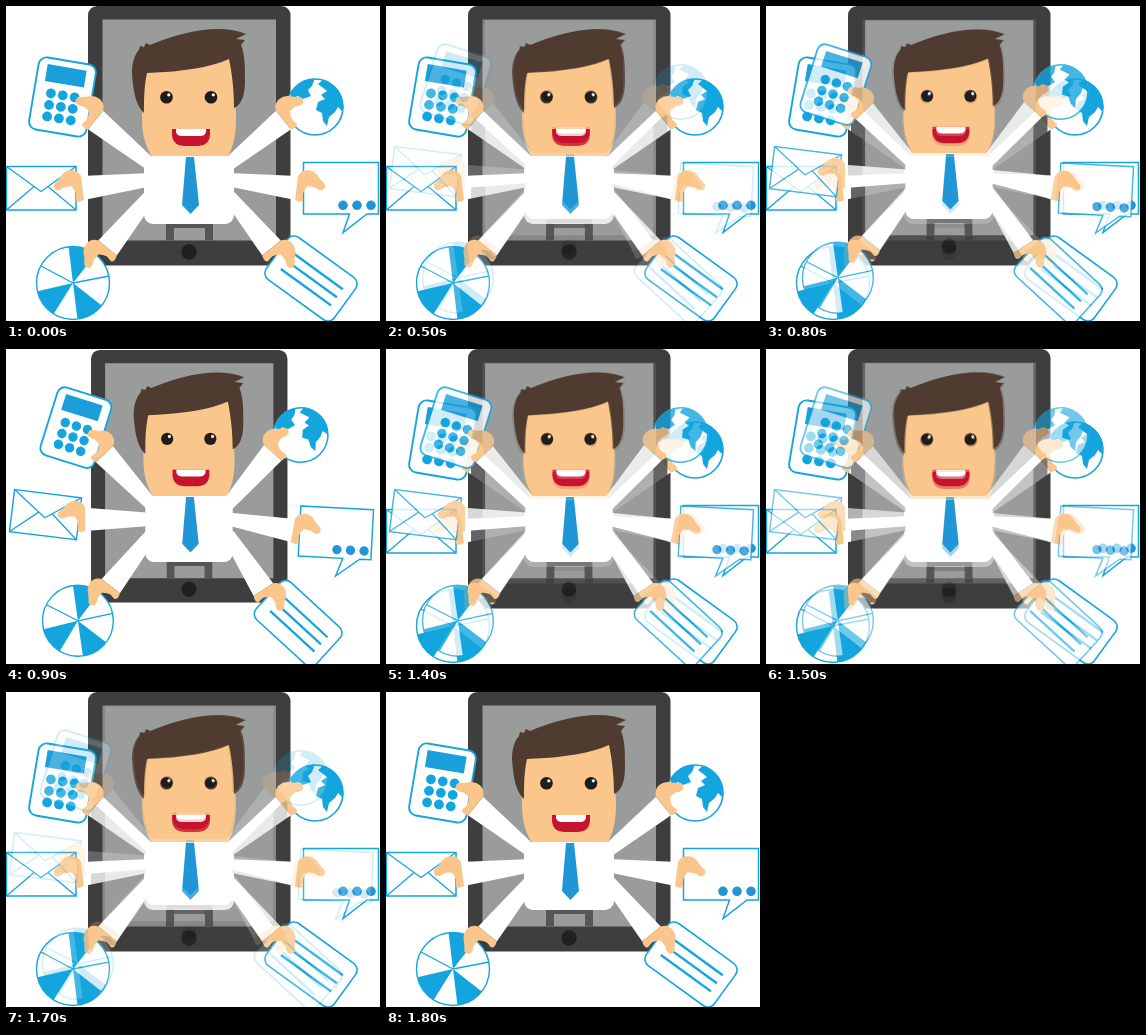
Animation of 374 by 315 pixels, one loop 2000 ms. Source, as an HTML page with a canvas:

```html
<!DOCTYPE html>
<html lang="en">
<head>
<meta charset="utf-8">
<title>Many-armed helper</title>
<style>
html, body { margin: 0; width: 100%; height: 100%; overflow: hidden; background: #fff; }
canvas { display: block; }
</style>
</head>
<body>
<canvas id="stage" width="374" height="315"></canvas>
<script>
const W = 374, H = 315, MID = 183.5, TAU = Math.PI * 2, RAD = Math.PI / 180;
const BLUE = '#14a5de', TIE = '#2196d6', SKIN = '#fac68b', DARK = '#3e3e3e';
const HAIR = '#4f3b30', GREY = '#9a9c9b', INK = '#211b1a', RED = '#c8132f';

// Each pair of arms mirrors one shoulder and wrist, measured out from the middle.
const HIGH = { shoulder: [42, 156], wrist: [94, 114] };
const LEVEL = { shoulder: [42, 174], wrist: [107, 182] };
const LOW = { shoulder: [42, 193], wrist: [82, 242] };

// In the tight pose every arm swings about its shoulder, carrying its item along.
const arms = [
  { side: -1, reach: HIGH, item: calc, x: 56.5, y: 91, tilt: 9.5, swing: 8 },
  { side: 1, reach: HIGH, item: globe, x: 309, y: 101, tilt: 0, swing: -10 },
  { side: -1, reach: LEVEL, item: mail, x: 35, y: 182, tilt: 0, swing: 7 },
  { side: 1, reach: LEVEL, item: chat, x: 335, y: 182, tilt: 0, swing: 3 },
  { side: -1, reach: LOW, item: pie, x: 67, y: 277, tilt: 0, swing: -1 },
  { side: 1, reach: LOW, item: note, x: 305, y: 272.5, tilt: 36, swing: 6.5 }
];

let c;

function fill(color, d) {
  c.fillStyle = color;
  c.fill(new Path2D(d));
}

function line(d, width) {
  c.strokeStyle = BLUE;
  c.lineWidth = width;
  c.stroke(new Path2D(d));
}

function dot(x, y, r, color) {
  c.beginPath();
  c.arc(x, y, r, 0, TAU);
  c.fillStyle = color;
  c.fill();
}

function ring(r, width) {
  c.beginPath();
  c.arc(0, 0, r, 0, TAU);
  c.strokeStyle = BLUE;
  c.lineWidth = width;
  c.stroke();
}

function box(x, y, w, h, r, color, edge) {
  c.beginPath();
  c.roundRect(x, y, w, h, r);
  c.fillStyle = color;
  c.fill();
  if (edge) {
    c.strokeStyle = BLUE;
    c.lineWidth = edge;
    c.stroke();
  }
}

function group(x, y, angle, draw, flip = 1) {
  c.save();
  c.translate(x, y);
  c.scale(flip, 1);
  c.rotate(angle);
  draw();
  c.restore();
}

function tablet() {
  box(82, 0, 202.5, 259.5, 9, DARK);
  box(96.5, 13.5, 173.5, 221, 0, GREY);
  dot(183, 246, 7.7, '#211f20');
  fill('#555657', 'M160 216H207V234.5H199V222H168V234.5H160Z');
}

function head() {
  fill(SKIN, 'M140 62L224 50C227 75 230 95 230 112C230 128 228 140 221 152H147C140 142 136 130 136 112C136 95 139 80 140 62Z');
  fill(HAIR, 'M138 107C130 100 127 85 126 67C126 56 129 48 133 44L134 40L138 41L140 37L144 39C165 30 190 23 212 23Q228 23 240 28L230 33L239 34L235 39C239 48 239 62 239 75C239 88 236 99 228 102C228 84 226 67 223 53Q197 65 141 67C138 80 138 94 138 107Z');
  for (const x of [160.5, 205]) {
    dot(x, 91.3, 6.3, INK);
    dot(x + 2.3, 88.8, 1.6, '#fff');
  }
  fill(RED, 'M166 123H204V129Q203 140 191 140H179Q167 140 166 129Z');
  fill('#fff', 'M170 123H200V126Q199 130 194 130H176Q171 130 170 126Z');
}

function shirt() {
  box(138, 150, 90, 68, 9, '#fff');
  fill(TIE, 'M180 151H188L193 199L184.5 208L176 199Z');
}

function calc() {
  box(-29, -36.5, 58, 73, 8, '#fff', 1.9);
  box(-20, -30, 39.5, 17, 0, '#1b9fdb');
  for (let i = 0; i < 9; i++) {
    dot((i % 3 - 1) * 12, 10 + (Math.floor(i / 3) - 1) * 11.7, 4.9, BLUE);
  }
}

function globe() {
  dot(0, 0, 28.5, '#fff');
  c.save();
  c.beginPath();
  c.arc(0, 0, 28.5, 0, TAU);
  c.clip();
  fill(BLUE, 'M-24 -16L-12 -28L0 -29L-3 -21L-7 -17L-4 -11L-12 -8L-17 -11L-24 -8Z');
  fill(BLUE, 'M3 -23L10 -29L22 -22L29 -8L28 5L23 0L20 5L14 10L12 19L8 14L7 6L1 3L3 -5L10 -8L6 -12L12 -16Z');
  c.restore();
  ring(28, 1.6);
}

function mail() {
  box(-34.5, -21.5, 69.5, 43.5, 0, '#fff', 1.5);
  line('M-34.5 -21.5L0 3.5L35 -21.5M-34.5 22L-7 -1.5M35 22L7 -1.5', 1.3);
}

function pie() {
  dot(0, 0, 36.5, '#fff');
  for (const start of [-97, 38, 122]) {
    c.beginPath();
    c.moveTo(0, 0);
    c.arc(0, 0, 36.5, start * RAD, (start + 45) * RAD);
    c.fillStyle = BLUE;
    c.fill();
  }
  line('M0 0L-32 -17M0 0L36 -7', 1.3);
  ring(36.5, 1.4);
}

function chat() {
  const d = 'M-37.5 -25.5H37.5V26H26L2 44.5L8.5 26H-37.5Z';
  fill('#fff', d);
  line(d, 1.5);
  for (let x = 2; x < 31; x += 14) dot(x, 17.3, 4.8, TIE);
}

function note() {
  box(-42, -26, 84, 52, 8, '#fff', 1.6);
  for (let y = -10; y <= 10; y += 10) line(`M-30 ${y}H32`, 2.4);
}

// Wrist at the origin, sleeve to the right, fingers to the left.
function hand() {
  fill(SKIN, 'M0 -12Q-3 -19 -10 -19Q-17 -19 -22 -12L-28 -7Q-29 -3 -26 -1Q-23 0 -18 -3L-11 -3Q-8 0 -7 5L-8 11Q-7 14 -3 13L0 12Z');
}

function sleeve(length) {
  fill('#fff', `M0 -12L${length} -6.5V6.5L0 12Z`);
}

function arm({ side, reach, item, x, y, tilt, swing }, tight) {
  const [sx, sy] = reach.shoulder, [wx, wy] = reach.wrist;
  const px = MID + side * sx;
  const bend = Math.atan2(sy - wy, wx - sx);
  const limb = draw => group(MID + side * wx, wy, bend, draw, -side);
  group(px, sy, tight * swing * RAD, () => {
    c.translate(-px, -sy);
    limb(() => sleeve(Math.hypot(wx - sx, sy - wy) + 4));
    group(x, y, tilt * RAD, item);
    limb(hand);
  });
}

function render(tight) {
  const layer = document.createElement('canvas');
  layer.width = W;
  layer.height = H;
  c = layer.getContext('2d');
  c.translate(183 * 0.03 * tight, tight);
  c.scale(1 - 0.03 * tight, 1 - 0.027 * tight);
  tablet();
  head();
  for (const a of arms) arm(a, tight);
  shirt();
  return layer;
}

const wideLayer = render(0), tightLayer = render(1);
const stage = document.getElementById('stage').getContext('2d');

// Share of the tight pose, in five hard steps each way.
function blend(t) {
  const rise = Math.floor((t - 400) / 100) / 5;
  const fall = Math.floor((1800 - t + 99) / 100) / 5;
  return Math.max(0, Math.min(1, rise, fall));
}

function frame(now) {
  const k = blend(now % 2000);
  stage.globalAlpha = 1;
  stage.fillStyle = '#fff';
  stage.fillRect(0, 0, W, H);
  if (k < 1) stage.drawImage(wideLayer, 0, 0);
  stage.globalAlpha = k;
  stage.drawImage(tightLayer, 0, 0);
}

let start;
function tick(now) {
  start ??= now;
  frame(now - start);
  requestAnimationFrame(tick);
}
frame(0);
requestAnimationFrame(tick);
</script>
</body>
</html>
```
